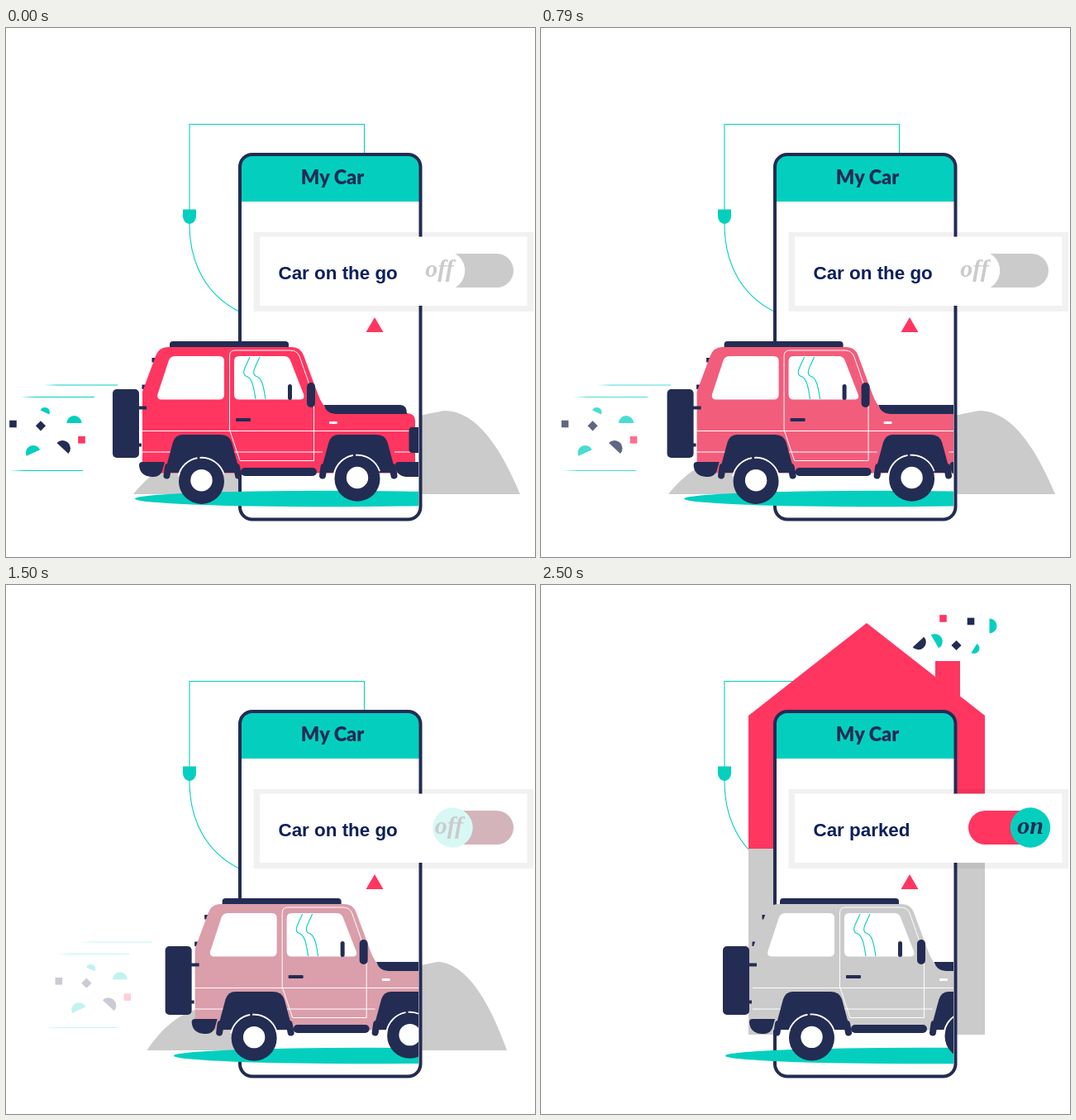
These frames come from a looping animation (640x640 px, 3570 ms). An HTML page:

```html
<!DOCTYPE html>
<html lang="en">
<head>
<meta charset="utf-8">
<title>My Car</title>
<style>
  html, body { margin: 0; width: 100%; height: 100%; overflow: hidden; background: #fff; }
  svg { display: block; width: 100%; height: 100%; }
  .navy { fill: #232c53; }
  .teal { fill: #04cfbf; }
  .red { fill: #ff3660; }
  .grey { fill: #cbcbcb; }
  .white { fill: #fff; }
  .thin { fill: none; stroke: #04cfbf; stroke-width: 1.1; }
  .seam { fill: none; stroke: #fff; stroke-width: 1; }
  .title { font: 900 23.5px Lato, sans-serif; text-anchor: middle; }
  .label { font: bold 22.4px "Liberation Sans", Arial, sans-serif; fill: #0b1f5c; }
  .state { font: italic bold 30px "Liberation Serif", "Times New Roman", serif; text-anchor: middle; }
</style>
</head>
<body>
<svg viewBox="0 0 640 640">
  <defs>
    <clipPath id="screen"><rect width="499" height="640"/></clipPath>
    <linearGradient id="streak">
      <stop offset="0" stop-color="#04cfbf" stop-opacity="0"/>
      <stop offset=".2" stop-color="#04cfbf"/>
    </linearGradient>
    <g id="fender">
      <path class="navy" d="M192 538L202 501Q205 492 214 492H259Q270 492 273 501L283 538Z"/>
      <path d="M196 531L194.500 541.500M279 531L281 541.500" stroke="#232c53" stroke-width="8" stroke-linecap="round"/>
    </g>
    <g id="wheel">
      <path d="M-28 -6A28.6 28.6 0 0 1 -5 -28.2M-2 -28.5A28.6 28.6 0 0 1 27 -9" fill="none" stroke="#fff" stroke-width="2"/>
      <circle class="navy" r="27.5"/>
      <circle class="white" cy="-1.2" r="13.2"/>
    </g>
  </defs>

  <g id="streaks" fill="url(#streak)">
    <rect x="45" y="431.5" width="90" height="1"/>
    <rect x="17" y="446" width="90" height="1"/>
    <rect x="4" y="535" width="89" height="1"/>
  </g>
  <g id="dust"></g>

  <path class="thin" d="M433.500 153V116.500H222V237C222 286 243 324 283 343.500"/>
  <path class="teal" d="M214 219.500H230V228A8 9 0 0 1 214 228Z"/>

  <path id="walls" class="grey"/>
  <path id="roof" class="red" d="M394 46L477 111V92H507V134.500L537 158V319H251V158Z"/>
  <g id="sparks"></g>

  <rect class="white" x="283" y="153" width="218.500" height="441.500" rx="15"/>
  <path class="teal" d="M283 210V168A15 15 0 0 1 298 153H486.500A15 15 0 0 1 501.500 168V210Z"/>
  <rect x="283" y="153" width="218.500" height="441.500" rx="15" fill="none" stroke="#232c53" stroke-width="4"/>
  <text class="title navy" x="395" y="189">My Car</text>

  <rect x="299.500" y="247" width="338.500" height="96" fill="#000" fill-opacity=".055"/>
  <rect class="white" x="307" y="252.500" width="323.500" height="83.500"/>
  <text id="label" class="label" x="329.500" y="304"></text>
  <rect id="pill" x="517" y="273" width="97" height="41" rx="20.500"/>
  <circle id="knob" cy="293.500" r="24.200"/>
  <text id="state" class="state" y="300.500"></text>
  <path class="red" d="M446 350L456.500 368H435.500Z"/>

  <g clip-path="url(#screen)">
    <ellipse id="shade" class="teal" cx="390" cy="569.500" rx="234" ry="9.800"/>
    <g id="car">
      <rect class="navy" x="129" y="437" width="32" height="83" rx="5"/>
      <path class="navy" d="M176.500 399H184V404.500H176.500ZM164.500 431.500H172V437H164.500Z"/>
      <path id="body" d="M165 440L181 397Q185 386 196 386H346Q356 386 360 396L377 442Q382 456 390 463L486 466Q495 467 495 475V538.500H165Z"/>
      <path class="navy" d="M160 457.500H170V461.500H160ZM160 502.500H164V506.500H160Z"/>
      <path class="navy" d="M198 386V383Q198 379 202 379H338Q342 379 342 383V386Z"/>
      <path class="white" d="M183.500 443L197 402Q199 397 205 397H258Q264 397 264 403V443.500Q264 449.500 258 449.500H188Q182 449 183.500 443Z"/>
      <path class="white" d="M276 403Q276 397 282 397H336Q342 397 344 402L360 443Q362 449.500 356 449.500H282Q276 449.500 276 443.500Z"/>
      <path class="thin" d="M295 398c-4 10 -11 19 -5 23c9 2 10 17 12 28M307 398c-4 10 -11 19 -5 23c9 2 10 17 12 28"/>
      <path class="seam" d="M270.500 397Q270.500 390 277 390H344Q352 390 355 397L372.500 447V523.500H283L270.500 486ZM165 487.500H495M165 513H383M470 513H495"/>
      <path class="navy" d="M384.500 456H477Q485 456 485 467H399Q388 467 384.500 456Z"/>
      <rect class="navy" x="278" y="472" width="18" height="4" rx="1"/>
      <rect class="white" x="391" y="476" width="10" height="3" rx="1"/>
      <rect class="navy" x="341" y="431" width="5" height="19" rx="2.500"/>
      <rect class="navy" x="364" y="429" width="10" height="30" rx="5"/>
      <rect class="navy" x="487.500" y="483" width="18" height="31" rx="4"/>
      <path class="navy" d="M161 529Q161 525 165 525H192L189 536Q186 543 179 543H176Q162 542 161 529ZM471 529Q471 525 475 525H506V543H484Q472 542 471 529Z"/>
      <rect class="navy" x="284" y="532" width="92" height="10" rx="5"/>
      <use href="#fender"/>
      <use href="#fender" x="188.500"/>
      <use id="rear" href="#wheel"/>
      <use id="front" href="#wheel"/>
    </g>
  </g>
</svg>
<script>
const LOOP = 3570, LAST = 35;
const NAVY = '#232c53', TEAL = '#04cfbf', RED = '#ff3660';
const rgb = { white: [255, 255, 255], grey: [203, 203, 203], red: [255, 54, 96], teal: [4, 207, 191] };
const el = id => document.getElementById(id);
const set = (id, attrs) => { for (const k in attrs) el(id).setAttribute(k, attrs[k]); };
const clamp = v => Math.min(1, Math.max(0, v));
const smooth = v => { v = clamp(v); return v * v * (3 - 2 * v); };
const easeOut = v => 1 - (1 - clamp(v)) ** 2;
const lerp = (a, b, u) => a + (b - a) * u;
const tint = (a, b, u) => `rgb(${rgb[a].map((v, i) => Math.round(lerp(v, rgb[b][i], u)))})`;
const grow = (x, y, sx, sy) => `translate(${x} ${y}) scale(${sx} ${sy}) translate(${-x} ${-y})`;

// A bit swings up and down by `sway` while the car bobs
const bit = (x, y, turn, fill, d, sway) =>
  `<g data-sway="${sway}"><path d="${d}" transform="translate(${x} ${y}) rotate(${turn})" fill="${fill}"/></g>`;
const half = (x, y, r, turn, fill, sway = 0) => bit(x, y, turn, fill, `M${-r} 0A${r} ${r} 0 0 1 ${r} 0Z`, sway);
const box = (x, y, turn, fill, sway = 0) => bit(x, y, turn, fill, 'M-4.3 -4.3H4.3V4.3H-4.3Z', sway);

el('dust').innerHTML =
  half(47, 465, 6, 25, TEAL, -1) + half(82.5, 478, 9, 0, TEAL, -8) +
  half(33, 514, 9, -25, TEAL, 2) + half(68.5, 508.5, 9.5, 43, NAVY, 2) +
  box(8.5, 479, 0, NAVY, 4) + box(42, 481.3, 45, NAVY, 5) + box(91.5, 498.3, 0, RED, 4);
el('sparks').innerHTML =
  box(486.5, 40.5, 0, RED) + box(520, 44, 0, NAVY) + box(502.5, 73, 45, NAVY) +
  half(542.5, 49.5, 9, 90, TEAL) + half(456.5, 69, 9.3, 137, NAVY) +
  half(476.5, 68.5, 9.3, 60, TEAL) + half(524, 76.5, 6.5, 122, TEAL);
const bits = [...el('dust').children];

// The hill's two flanks, each a cubic; they straighten into the house walls
const hill = [[154, 564], [180, 532], [205, 520], [240, 520], [530, 463], [575, 463], [604, 522], [622, 564]];
function wallPath(u) {
  const squeeze = 1 - .33 * Math.sin(Math.PI * u);
  const p = hill.map(([x, y], i) => {
    const left = i < 4, rise = (left ? i : 7 - i) / 3;
    const wx = lerp(x, left ? 251 : 537, u);
    return [388.5 + (wx - 388.5) * squeeze, lerp(y, 544 - 226 * rise, u)].join(' ');
  });
  return `M${p[0]}C${p.slice(1, 4)}L${p[4]}C${p.slice(5)}Z`;
}

function draw(n) {
  const go = smooth(n / 33), on = smooth((n - 17) / 16), dx = 91 * go;
  const fade = clamp(1 - 1.09 * go), bob = Math.cos(2 * Math.PI * n / 11);
  const parked = n >= 28;

  set('car', { transform: `translate(${dx} 0)` });
  set('body', { fill: tint('red', 'grey', go) });
  set('shade', { cx: 390 + 67 * go });
  set('rear', { transform: `translate(236.5 ${547.8 + .6 * bob})` });
  set('front', { transform: `translate(425 ${546 - .8 * bob})` });

  set('streaks', { transform: `translate(${2 * n} 0)`, opacity: fade });
  set('dust', { transform: `translate(${.87 * dx} 0)`, opacity: fade });
  for (const b of bits) b.setAttribute('transform', `translate(0 ${b.dataset.sway * (1 - bob) / 2})`);

  const rise = easeOut((n - 28) / 5.5), pop = clamp((n - 32) / 3);
  set('walls', { d: wallPath(clamp((n - 17) / 18) ** 2) });
  set('roof', { transform: grow(394, 319, .45 + .55 * rise, rise) });
  set('sparks', { transform: grow(492, 100, pop, pop), opacity: pop });

  const x = lerp(531, 592, on);
  set('pill', { fill: tint('grey', 'red', on) });
  set('knob', { cx: x, fill: tint('white', 'teal', on) });
  set('state', { x: parked ? x : 524.5 + 73 * on, fill: parked ? NAVY : '#cbcbcb' });
  el('state').textContent = parked ? 'on' : 'off';
  el('label').textContent = parked ? 'Car parked' : 'Car on the go';
}

// 14 steps a second, then a hold on the last pose
const startOf = n => Math.round(n * 50 / 7) * 10;
function stepAt(t) {
  let n = Math.min(LAST, Math.ceil(t * 7 / 500) + 1);
  while (n > 0 && startOf(n) > t) n--;
  return n;
}

let begin = null, shown = -1;
function tick(now) {
  if (begin === null) begin = now;
  const n = stepAt((now - begin) % LOOP);
  if (n !== shown) draw(shown = n);
  requestAnimationFrame(tick);
}
draw(0);
requestAnimationFrame(tick);
</script>
</body>
</html>
```
